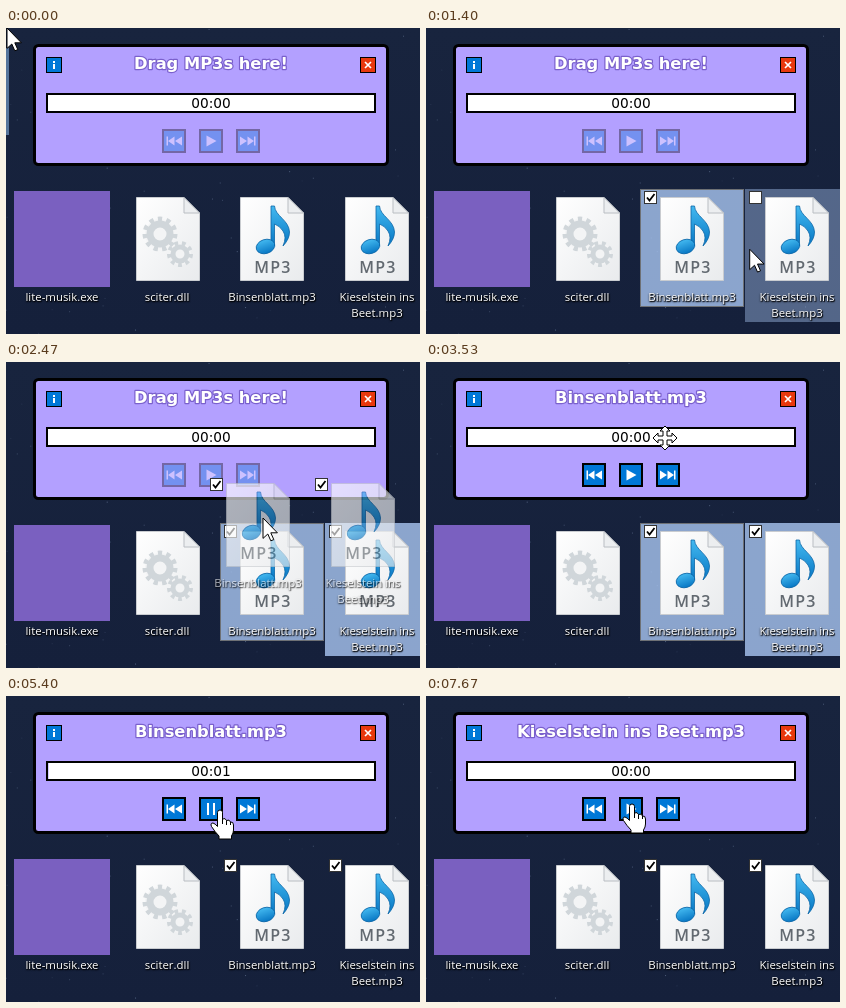
Write an HTML page that moves like this. It is 414 by 306 pixels and loops after 8 s.

```html
<!DOCTYPE html>
<html lang="de">
<head>
<meta charset="utf-8">
<title>Music player</title>
<style>
html, body { margin: 0; height: 100%; overflow: hidden; background: #17223d; }
svg { display: block; width: 100vw; height: 100vh; }
.label { font: 500 11.4px "Open Sans", sans-serif; fill: #fff; text-anchor: middle;
  text-shadow: 1px 1px 1px #000, 0 1px 2px #000; }
#title { font: bold 16.3px "DejaVu Sans", sans-serif; fill: #fff; stroke: #7a60cc; stroke-width: 2.4px;
  stroke-linejoin: round; paint-order: stroke; text-anchor: middle; }
#time { font: 13.7px "DejaVu Sans", sans-serif; text-anchor: middle; }
.mp3 { font: 600 16px "Open Sans", sans-serif; letter-spacing: 1.2px; fill: #626970; text-anchor: middle; }
.btn { fill: #0078d7; stroke: #000; }
.cursor { fill: #fff; stroke: #000; stroke-linejoin: round; }
</style>
</head>
<body>
<svg viewBox="0 0 414 306">
  <defs>
    <linearGradient id="sky" x2="0" y2="1">
      <stop stop-color="#18243e"/><stop offset="1" stop-color="#15203b"/>
    </linearGradient>
    <linearGradient id="paper" x2="1" y2="1">
      <stop stop-color="#fff"/><stop offset="1" stop-color="#e9ebed"/>
    </linearGradient>
    <linearGradient id="blue" x2="0" y2="1">
      <stop stop-color="#43b9f0"/><stop offset="1" stop-color="#0877c4"/>
    </linearGradient>
    <g id="page">
      <path d="M.5 .5H48L63.5 16V83.5H.5Z" fill="url(#paper)" stroke="#c9ccd0"/>
      <path d="M48 .5V16H63.5Z" fill="#eceef0" stroke="#b9bdc2"/>
    </g>
    <g id="song">
      <use href="#page"/>
      <g fill="url(#blue)" stroke="#0b66a8" stroke-width=".8">
        <path d="M31 9H34.500C35 19 49 23 49.500 35Q49.500 42 43 49Q47 40 43 34Q40 29 34.500 27V49H31Z"/>
        <ellipse cx="25.500" cy="49.500" rx="9.500" ry="7" transform="rotate(-18 25.500 49.500)"/>
      </g>
      <text class="mp3" x="33" y="76">MP3</text>
    </g>
    <g id="box">
      <rect x=".5" y=".5" width="12" height="12" fill="#fff" stroke="#333"/>
    </g>
    <path id="tick" d="M3 6.500L5.500 9.500L10.500 3" fill="none" stroke="#000" stroke-width="1.800"/>
    <path id="skip" d="M6 12L12.500 7.500V16.500ZM13 12L20 7.500V16.500ZM4.500 7.500H6V16.500H4.500Z" fill="#fff"/>
  </defs>

  <rect width="414" height="306" fill="url(#sky)"/>
  <g id="stars" fill="#8ea3c4"></g>
  <rect id="strip" y="20" width="3" height="87" fill="#56759c"/>
  <g id="marks" fill="#a9c6f2"></g>
  <rect id="focus" fill="none" stroke="#503c1c" stroke-dasharray="1 1"/>

  <rect x="8" y="163" width="96" height="96" fill="#7a60c0"/>
  <use href="#page" x="130" y="169"/>
  <g fill="#f3f4f5" stroke="#d0d6da">
    <circle cx="154" cy="206" r="15" stroke-width="5" pathLength="22" stroke-dasharray="1 1"/>
    <circle cx="154" cy="206" r="10" stroke-width="7"/>
    <circle cx="174" cy="226" r="11" stroke-width="4" pathLength="18" stroke-dasharray="1 1"/>
    <circle cx="174" cy="226" r="7" stroke-width="5"/>
  </g>
  <g class="label">
    <text x="56" y="273">lite-musik.exe</text>
    <text x="161" y="273">sciter.dll</text>
  </g>
  <g id="songs">
    <use href="#song" x="234" y="169"/>
    <use href="#song" x="339" y="169"/>
    <g class="label">
      <text x="266" y="273">Binsenblatt.mp3</text>
      <text x="371" y="273">Kieselstein ins</text>
      <text x="371" y="289">Beet.mp3</text>
    </g>
  </g>
  <g id="checks"></g>

  <rect x="28.5" y="17.5" width="353" height="119" rx="4" fill="#b3a0ff" stroke="#000" stroke-width="3"/>
  <rect class="btn" x="40.5" y="29.5" width="15" height="15"/>
  <path d="M47 33h2v2h-2zM47 36h2v5h-2z" fill="#fff"/>
  <rect x="354.5" y="29.5" width="15" height="15" fill="#e8380d" stroke="#000"/>
  <path d="M359 34l6 6m0-6l-6 6" stroke="#fff" stroke-width="1.7"/>
  <text id="title" x="205" y="41"></text>
  <rect x="41" y="66" width="328" height="18" fill="#fff" stroke="#000" stroke-width="2"/>
  <rect id="fill" x="42" y="67" height="16" fill="#b3a0ff"/>
  <text id="time" x="205" y="80"></text>
  <g id="buttons">
    <g class="btn" stroke-width="2">
      <rect x="157" y="102" width="22" height="22"/>
      <rect x="194" y="102" width="22" height="22"/>
      <rect x="231" y="102" width="22" height="22"/>
    </g>
    <use href="#skip" x="156" y="101"/>
    <use href="#skip" transform="matrix(-1 0 0 1 254 101)"/>
    <path id="icon" fill="#fff"/>
  </g>

  <g id="ghost">
    <use href="#songs" opacity=".65"/>
    <use href="#box" x="218" y="164"/><use href="#tick" x="218" y="164"/>
    <use href="#box" x="323" y="164"/><use href="#tick" x="323" y="164"/>
  </g>
  <path id="cursor" class="cursor"/>
</svg>
<script>
const $ = id => document.getElementById(id);
const set = (el, attrs) => { for (const k in attrs) el.setAttribute(k, attrs[k]); };
const show = (el, on) => el.style.display = on ? "" : "none";
const add = (parent, tag, attrs) => {
  const el = document.createElementNS("http://www.w3.org/2000/svg", tag);
  set(el, attrs);
  return parent.appendChild(el);
};

const LOOP = 8000, TICK = 1000 / 15;
const SHAPES = {
  arrow: "M0 0V20.4L4.8 16L7.8 22.8L10.8 21.6L7.8 14.8H14.4Z",
  move: "M0-12L5-7H2V-2H7V-5L12 0L7 5V2H2V7H5L0 12L-5 7H-2V2H-7V5L-12 0L-7-5V-2H-2V-7H-5Z",
  hand: "M-2.5 2.5Q-2.5 0 0 0T2.5 2.5V9Q5.5 7.5 6.5 10.5Q9.5 9 10.5 12Q13.5 11.5 13.5 15V20Q13.5 23 11.5 26V29H-1V26Q-5 22 -8.5 16.5Q-10 13 -7 13Q-5 13.5 -2.5 16.5ZM2.5 9V14M6.5 10.5V15M10.5 12V15"
};
const PLAY = "M200.5 107.5L210.5 113L200.5 118.5Z";
const PAUSE = "M201 107h2v12h-2zM207 107h2v12h-2z";

// Pointer path: tick, x, y, eased segment
const PATH = [
  [1, 1, 0], [14, 265, 231, 1], [16, 266, 230], [25, 365, 215, 1], [28, 365, 215],
  [31, 284, 211], [33, 271, 204], [34, 271, 204], [37, 257, 156], [41, 240, 94],
  [42, 239, 74], [52, 239, 74], [53, 239, 76], [62, 214, 114, 1], [81, 214, 114],
  [93, 238, 111, 1], [103, 239, 108, 1], [109, 239, 108], [115, 206, 108, 1]
];

function pointer(n) {
  const i = PATH.findIndex(p => p[0] >= n);
  if (i < 0) return PATH.at(-1).slice(1, 3);
  if (i == 0) return PATH[0].slice(1, 3);
  const [a, b] = [PATH[i - 1], PATH[i]];
  let u = (n - a[0]) / (b[0] - a[0]);
  if (b[3]) u = u * u * (3 - 2 * u);
  return [a[1] + (b[1] - a[1]) * u, a[2] + (b[2] - a[2]) * u];
}

let seed = 7;
const rnd = () => (seed = seed * 16807 % 2147483647) / 2147483647;
for (let i = 0; i < 80; i++)
  add($("stars"), "rect", { x: rnd() * 414, y: rnd() * 306, width: 1, height: 1, opacity: .1 + rnd() * .4 });

const files = [0, 1, 2, 3].map(i => {
  const x = 4 + i * 105, height = i == 3 ? 133 : 118;
  const mark = add($("marks"), "rect", { x, y: 161, width: 104, height });
  const check = add($("checks"), "g", { transform: `translate(${x + 4} 163)` });
  add(check, "use", { href: "#box" });
  const tick = add(check, "use", { href: "#tick" });
  return { x, height, mark, check, tick };
});

function draw(t) {
  const n = Math.floor((t + 4) / TICK);
  const [x, y] = pointer(n);
  const inWindow = x > 27 && x < 383 && y > 16 && y < 138;
  const onButton = y > 101 && y < 125 && [156, 193, 230].some(b => x >= b && x <= b + 24);
  const dragging = n >= 34 && n < 46;
  const loaded = n >= 46, next = n >= 98, playing = n >= 64 && !next;
  const active = n < 62;

  files.forEach((f, i) => {
    const hover = !dragging && y > 161 && y < 161 + f.height && x >= f.x && x < f.x + 105;
    const picked = i == 2 && n >= 15 || i == 3 && n >= 26;
    f.mark.setAttribute("opacity", picked && active ? .8 : hover ? .42 : 0);
    show(f.check, picked || hover);
    show(f.tick, picked);
  });
  const focused = files[n >= 26 && n < 33 ? 3 : 2];
  set($("focus"), { x: focused.x + .5, y: 161.5, width: 103, height: focused.height - 1 });
  show($("focus"), n >= 15 && active);
  show($("strip"), n < 2);

  show($("ghost"), dragging && !inWindow);
  set($("ghost"), { transform: `translate(${x - 271} ${y - 204})` });

  $("title").textContent = next ? "Kieselstein ins Beet.mp3" : loaded ? "Binsenblatt.mp3" : "Drag MP3s here!";
  $("time").textContent = "00:0" + (next || n < 71 ? 0 : n < 86 ? 1 : 2);
  $("fill").setAttribute("width", n >= 81 && !next ? (n - 74) * .08 : 0);
  $("buttons").setAttribute("opacity", loaded ? 1 : .35);
  $("icon").setAttribute("d", playing ? PAUSE : PLAY);

  const shape = dragging || !inWindow ? "arrow" : onButton && loaded ? "hand" : "move";
  set($("cursor"), { d: SHAPES[shape], transform: `translate(${x} ${y})` });
}

const start = performance.now();
function frame() {
  draw((performance.now() - start) % LOOP);
  requestAnimationFrame(frame);
}
frame();
</script>
</body>
</html>
```
